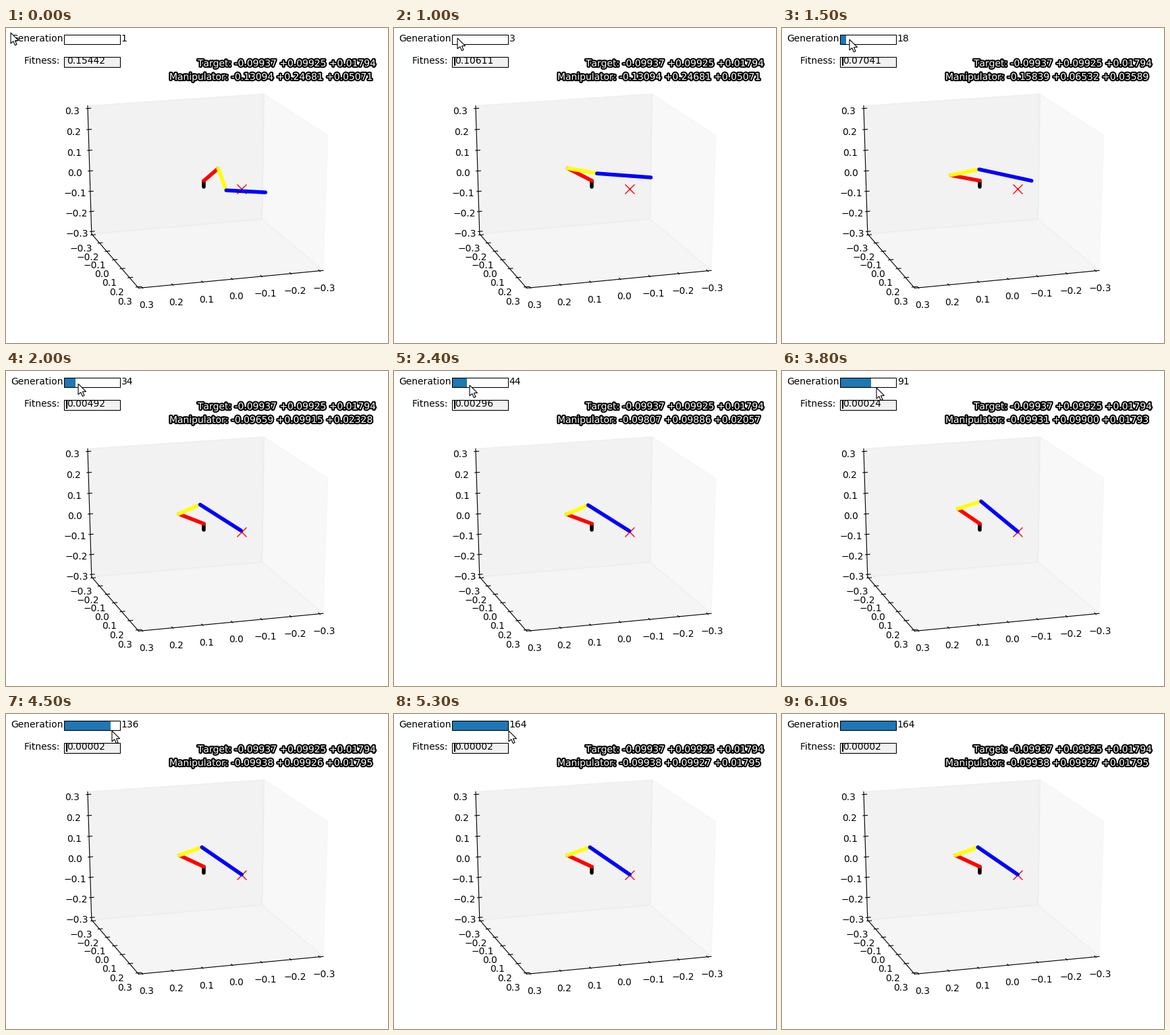
A matplotlib script that plays this animation: 566x468 px, repeating every 6.7 s.

```python
import numpy as np
import matplotlib.pyplot as plt
from matplotlib.animation import FuncAnimation
from matplotlib.patches import Polygon, Rectangle
from matplotlib.patheffects import withStroke

W, H, DPI = 566, 468, 100
FRAMES, INTERVAL = 67, 100
MAX_GEN = 164
TARGET = np.array([-0.09937, 0.09925, 0.01794])

plt.rcParams.update({"font.family": "DejaVu Sans", "font.size": 10,
                     "text.kerning_factor": 6})

# Perspective camera looking at a cube of side SIDE centred on the origin
SIDE, HALF = 0.625, 0.3125
AZIM, ELEV, DIST = np.radians(73), np.radians(20.8), 10
CENTER, SCALE = (293.2, 236.3), (279.5, 209)
RIGHT = np.array([-np.sin(AZIM), np.cos(AZIM), 0])
TOWARD = np.array([np.cos(AZIM) * np.cos(ELEV), np.sin(AZIM) * np.cos(ELEV),
                   np.sin(ELEV)])
UP = np.cross(TOWARD, RIGHT)

# Arm: a post, two equal links and a long hand link
POST, LINK, HAND = 0.03, 0.1, 0.18

# Best solutions: generation, hand pitch (degrees), hand position
BEST = np.array([
    (1, 12.3, -0.13094, 0.24681, 0.05071),
    (3, -7, -0.18929, 0.04840, 0.04220),
    (30, -32, -0.09659, 0.09915, 0.02328),
    (34, -32, -0.09727, 0.09865, 0.02235),
    (53, -31.2, -0.09966, 0.09927, 0.01701),
    (86, -41, -0.09931, 0.09900, 0.01793),
    (91, -41, -0.09930, 0.09902, 0.01794),
    (128, -34.8, -0.09938, 0.09926, 0.01795),
    (160, -34.8, -0.09938, 0.09927, 0.01795),
])

# Slider drag: frame, generation, pointer x, pointer y
DRAG = np.array([
    (0, 1, 7, 7),
    (9, 1, 92, 15),
    (10, 3, 94, 15),
    (20, 34, 107, 19),
    (29, 56, 119, 23),
    (38, 91, 140, 25),
    (45, 136, 157, 25),
    (52, MAX_GEN, 170, 25),
])
LEAVE, GONE = 56, 61
POINTER = np.array([(0, 0), (0, 16), (3.8, 12.6), (6.4, 18.6), (9, 17.5),
                    (6.5, 11.7), (11.6, 11.6)])

fig = plt.figure(figsize=(W / DPI, H / DPI), dpi=DPI, facecolor="white")
ax = fig.add_axes([0, 0, 1, 1])
ax.set_xlim(0, W)
ax.set_ylim(H, 0)
ax.axis("off")


def project(points):
    """Turn 3D points into pixel coordinates, one row each."""
    q = np.asarray(points) / SIDE
    depth = DIST / (DIST - q @ TOWARD)
    return np.column_stack([CENTER[0] + SCALE[0] * (q @ RIGHT) * depth,
                            CENTER[1] - SCALE[1] * (q @ UP) * depth])


def line(points, color="black", lw=0.8, **kw):
    return ax.plot(*np.transpose(points), color=color, lw=lw, **kw)[0]


def label(x, y, text="", ha="left", va="baseline", **kw):
    return ax.text(x, y, text, ha=ha, va=va, **kw)


def box(x, y, w, h, z, **kw):
    return ax.add_patch(Rectangle((x, y), w, h, zorder=z, **kw))


def draw_pane(axis, shade):
    """Back wall or floor: the cube face at the low end of an axis."""
    square = [(-1, -1), (1, -1), (1, 1), (-1, 1)]
    corners = np.insert(np.array(square) * HALF, axis, -HALF, axis=1)
    ax.add_patch(Polygon(project(corners), fc=str(shade), ec=str(shade),
                         alpha=0.5, lw=1, zorder=1))


def draw_axis(axis, corner, tick_axis):
    """Axis line through a cube corner, with ticks and numbers."""
    side = np.array(corner, float)
    unit = np.eye(3)
    line(project([side * HALF - unit[axis] * HALF,
                  side * HALF + unit[axis] * HALF]), zorder=2)
    tick = side * unit[tick_axis] * SIDE / 120
    for k in range(-3, 4):
        spot = side * HALF + unit[axis] * k / 10
        line(project([spot + tick, spot - 2 * tick]), zorder=2)
        x, y = project([spot + side * 0.0425])[0]
        label(x, y, f"{k / 10:.1f}".replace("-", "\u2212"), "center", "top")


for axis, shade in enumerate((0.95, 0.90, 0.925)):
    draw_pane(axis, shade)
draw_axis(0, (0, 1, -1), 1)
draw_axis(1, (1, 0, -1), 0)
draw_axis(2, (1, -1, 0), 0)

# Target and arm
ax.plot(*project([TARGET])[0], "x", color="red", ms=10, mew=1, zorder=3)
thick = dict(lw=4, solid_capstyle="round")
line(project([(0, 0, 0), (0, 0, POST)]), zorder=4, **thick)
links = [line([(0, 0), (0, 0)], color, zorder=5, **thick)
         for color in ("red", "yellow", "blue")]

# Controls
label(84.3, 20, "Generation", "right")
label(79.9, 53, "Fitness:", "right")
BAR_X, BAR_Y, BAR_W = 86.2, 9.8, 83
bar = box(BAR_X, BAR_Y, 0, 14, 2, fc="#1f77b4", ec="none")
box(BAR_X, BAR_Y, BAR_W, 14, 3, fc="none", ec="black", lw=0.8)
box(BAR_X, 42.8, BAR_W, 15, 2, fc="0.95", ec="black", lw=0.8)
gen_text = label(170.8, 20)
fit_text = label(90.2, 53)
caret = line([(90, 43), (90, 56)], lw=1.5, zorder=4, solid_capstyle="butt")


# Readouts
def triple(values):
    return " ".join(f"{v:+.5f}" for v in values)


outlined = dict(color="white",
                path_effects=[withStroke(linewidth=3, foreground="black")])
label(284, 57, "Target: " + triple(TARGET), **outlined)
hand_text = label(242, 77, **outlined)

pointer = ax.add_patch(Polygon(POINTER, fc="white", ec="black", lw=0.8, zorder=20))


def drag(frame):
    """Generation and pointer position while the slider is dragged."""
    gen, x, y = (np.interp(frame, DRAG[:, 0], col) for col in DRAG.T[1:])
    return int(round(gen)), np.array([x, y])


def best(gen):
    """Pitch and hand position; they improve in three jumps per stage."""
    i = np.searchsorted(BEST[:, 0], gen, side="right") - 1
    a, b = BEST[i], BEST[min(i + 1, len(BEST) - 1)]
    t = np.floor(3 * (gen - a[0]) / max(b[0] - a[0], 1)) / 3 if i + 1 < len(BEST) else 0
    row = a + t * (b - a)
    return row[1], row[2:]


def joints(pitch, hand):
    """Shoulder, elbow, wrist and hand, solved in the arm's upright plane."""
    reach = np.hypot(hand[0], hand[1])
    angle = np.radians(pitch)
    shoulder, tip = np.array([0, POST]), np.array([reach, hand[2]])
    wrist = tip - HAND * np.array([np.cos(angle), np.sin(angle)])
    span = wrist - shoulder
    size = np.hypot(*span)
    bend = np.sqrt(max(LINK ** 2 - size ** 2 / 4, 0))
    elbow = shoulder + span / 2 + bend * np.array([-span[1], span[0]]) / size
    heading = hand[:2] / reach
    return [(*(r * heading), z) for r, z in (shoulder, elbow, wrist, tip)]


def update(frame):
    gen, spot = drag(frame)
    pitch, hand = best(gen)
    chain = project(joints(pitch, hand))
    for link, a, b in zip(links, chain, chain[1:]):
        link.set_data(*zip(a, b))

    bar.set_width(BAR_W * (gen - 1) / (MAX_GEN - 1))
    gen_text.set_text(str(gen))
    fit_text.set_text(f"{np.linalg.norm(TARGET - hand):.5f}")
    caret.set_visible(frame > 0)

    # The position readout trails the arm by one step.
    shown = best(drag(max(frame - 1, 0))[0])[1]
    hand_text.set_text("Manipulator: " + triple(shown))

    # The pointer speeds away to the lower right once the drag is over.
    away = max(frame - LEAVE, 0) / (GONE - 1 - LEAVE)
    pointer.set_xy(POINTER + np.round(spot + away ** 2 * np.array([186, 405])))
    pointer.set_visible(frame < GONE)
    return [*links, bar, gen_text, fit_text, caret, hand_text, pointer]


anim = FuncAnimation(fig, update, frames=FRAMES, interval=INTERVAL,
                     repeat=True, repeat_delay=0, blit=False)
plt.show()
```
